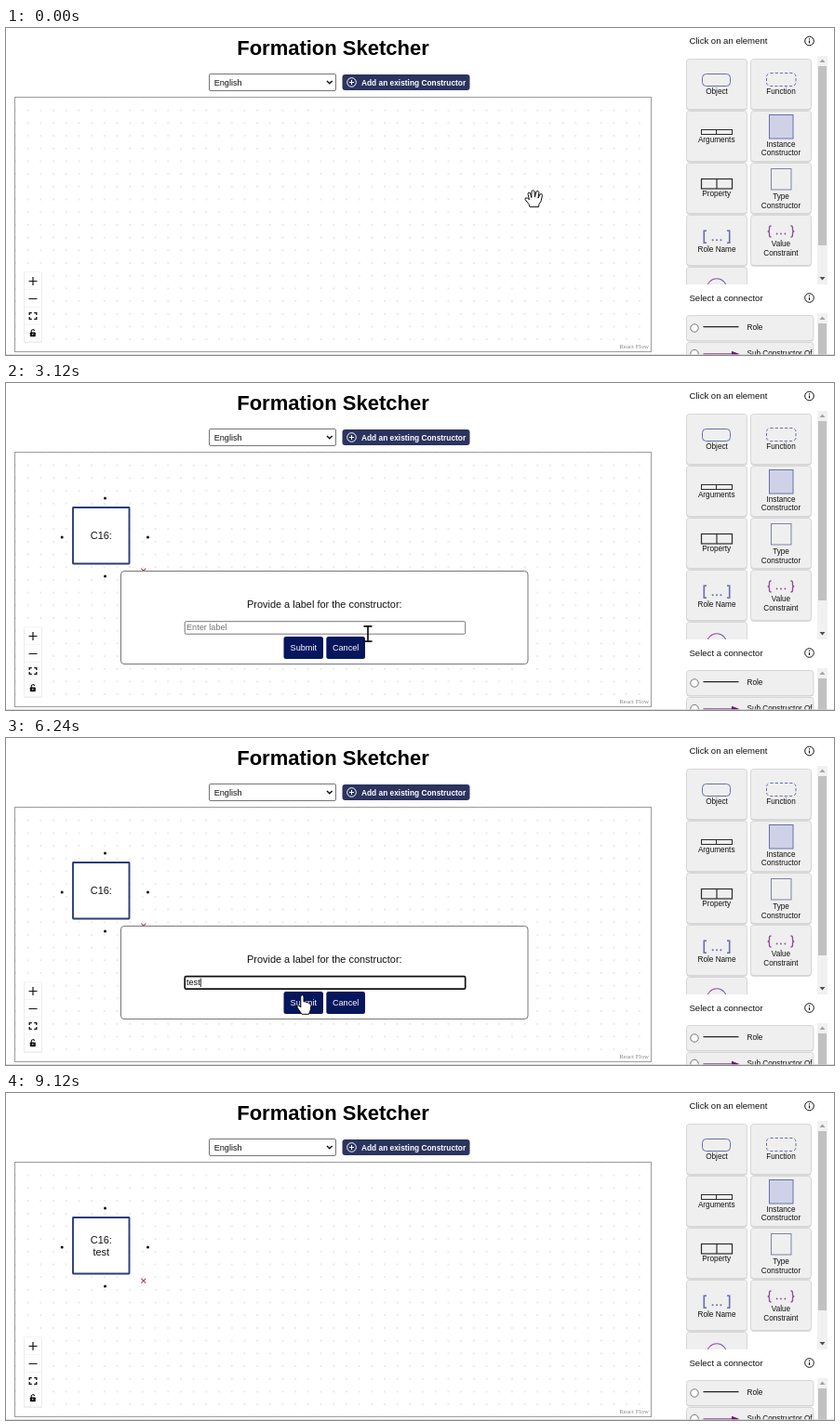
Recreate the animation shown at these times as an HTML page. Size 890x352 px, loop 9200 ms.

```html
<!DOCTYPE html>
<html lang="en">
<head>
<meta charset="utf-8">
<title>Formation Sketcher</title>
<style>
html, body { margin: 0; width: 100%; height: 100%; overflow: hidden; background: #fff; }
svg { display: block; width: 890px; height: 352px; }
text { font-family: "Liberation Sans", Arial, sans-serif; fill: #111; white-space: pre; }
</style>
</head>
<body>
<svg id="stage" viewBox="0 0 890 352" xmlns="http://www.w3.org/2000/svg"></svg>
<script>
const LOOP = 9200, STEP = 80;
const OPEN = 2640, FOCUS = 3680, CLOSE = 6560;
const KEYS = [[4560, 't'], [4640, 'te'], [5040, 'tes'], [5200, 'test']];
// time, x, y of the mouse
const MOUSE = [
  [0, 567, 183.6], [1200, 567, 183.6], [1840, 835, 174], [2560, 835, 174],
  [3040, 389, 270], [3760, 389, 270], [4080, 387, 278], [5600, 387, 278],
  [6080, 320, 287], [6560, 320, 287], [6960, 317, 300], [7680, 317, 300],
  [8240, 300, -20], [LOOP, 300, -20]
];
const NAVY = '#2c3c78', BLUE = '#666fae', PURPLE = '#8f4a9b';
const GAP = 13.69;
// text sizes
const SMALL = 8.2, FIELD = 9.15, SIDE = 9.56, BODY = 10.95;

const rect = (x, y, w, h, fill, stroke = 'none', r = 0, more = '') =>
  `<rect x="${x}" y="${y}" width="${w}" height="${h}" rx="${r}" fill="${fill}" stroke="${stroke}" ${more}/>`;
const path = (d, stroke, w = 1, fill = 'none', more = '') =>
  `<path d="${d}" stroke="${stroke}" stroke-width="${w}" fill="${fill}" ${more}/>`;
const circle = (x, y, r, fill, stroke = 'none', w = 1) =>
  `<circle cx="${x}" cy="${y}" r="${r}" fill="${fill}" stroke="${stroke}" stroke-width="${w}"/>`;
const text = (x, y, s, size, more = '') =>
  `<text x="${x}" y="${y}" font-size="${size}" ${more}>${s}</text>`;
const MID = 'text-anchor="middle"';

const tilePos = i => [i % 2 ? 800.5 : 731.5, 33.5 + 56 * (i >> 1)];

function tile(i) {
  const [x, y] = tilePos(i);
  return rect(x, y + 1, 65, 54.3, '#cdcdcd', 'none', 3) +
    rect(x, y, 65, 54, '#efefef', '#d6d6d6', 3, `id="tile${i}"`);
}

function label(x, y, ...lines) {
  return lines.map((s, i) => text(x, y + i * 9.6, s, SMALL, MID)).join('');
}

function info(y) {
  return circle(863.5, y, 4.8, '#fff', '#111', 1) +
    path(`M863.5 ${y - .6}v3.2M863.5 ${y - 2.8}v1.2`, '#111', 1.1);
}

function header() {
  return text(351.5, 29, 'Formation Sketcher', 22, MID + ' font-weight="700" style="fill:#000"') +
    rect(218.5, 49.5, 136, 18, '#fff', '#767676', 1.5) +
    text(223.7, 61.8, 'English', FIELD) +
    path('M345 57l2.8 2.8 2.8-2.8', '#111', 1.5) +
    rect(361.5, 50, 137, 17, '#2b345f', 'none', 3) +
    circle(371.5, 58.5, 4.8, 'none', '#fff', 1) +
    path('M369 58.5h5M371.5 56v5', '#fff', 1) +
    text(382, 61.7, 'Add an existing Constructor', 8.36, 'font-weight="700" style="fill:#fff"');
}

function controls() {
  const rows = [0, 1, 2, 3].map(i => rect(20, 263 + i * 18.75, 18, 18.25, '#fefefe')).join('');
  return rect(19, 262.5, 20, 76.5, '#ececec', 'none', 1) + rows +
    path('M24.5 272.5h9M29 268v9M24.5 291.5h9', '#111', 1.2) +
    path('M25.2 309v-2.3h2.6M30.2 306.7h2.6v2.3M32.8 311v2.3h-2.6M27.8 313.3h-2.6v-2.3', '#111', 1.3) +
    rect(25.8, 327.5, 6, 4.8, '#111', 'none', .8) +
    path('M27.2 328v-1.6a1.8 1.8 0 0 1 3.5-.5', '#111', 1.1) +
    circle(28.8, 329.8, .7, '#fff');
}

function canvasArea() {
  return rect(9.5, 74.5, 684, 274, 'url(#dots)', '#9c9c9c') +
    text(691, 345, 'React Flow', 6.95, 'text-anchor="end" style="fill:#888;font-family:\'Liberation Serif\',Times,serif"') +
    controls();
}

function scrollbar(top, bottom, thumbTop, thumbEnd) {
  return rect(872, top, 11, bottom - top, '#f1f1f1') +
    rect(873, thumbTop, 9, thumbEnd - thumbTop, '#c1c1c1') +
    path(`M874.5 ${top + 7}h6l-3-3.4z`, 'none', 0, '#a3a3a3');
}

function elements() {
  let s = '<g clip-path="url(#list)">';
  for (let i = 0; i < 9; i++) s += tile(i);
  const dark = '#2c2c2c';
  s += rect(748.5, 49.5, 30, 13, 'none', BLUE, 4) +
    rect(817.5, 48.5, 31.5, 14, 'none', BLUE, 4, 'stroke-dasharray="3.2 2"') +
    rect(747.5, 109.5, 33, 5, 'none', dark) + path('M763.5 109v6', dark) +
    rect(820.5, 93.5, 25.5, 25.5, '#cfd2e6', BLUE) +
    rect(747.5, 162.5, 33, 10.5, 'none', dark, 0, 'stroke-width="1.2"') + path('M764 162v11', dark, 1.2) +
    rect(822.5, 151.5, 21.5, 22.5, 'none', '#7d83a8') +
    path('M753 218.2h-2.7v13h2.7M775 218.2h2.7v13h-2.7', BLUE, 1.6) +
    path('M822.5 213q-2 0-2 2v2q0 2-1.8 2 1.8 0 1.8 2v2q0 2 2 2M843.5 213q2 0 2 2v2q0 2 1.8 2-1.8 0-1.8 2v2q0 2-2 2', PURPLE, 1.3) +
    [-4.4, 0, 4.4].map(d => circle(764 + d, 228.2, 1, BLUE) + circle(833 + d, 221.5, .9, PURPLE)).join('') +
    circle(764, 280.3, 10.5, 'none', 'url(#ring)', 1.1) +
    label(764, 70.5, 'Object') + label(833, 71, 'Function') +
    label(763.7, 123, 'Arguments') + label(833, 127.8, 'Instance', 'Constructor') +
    label(763.7, 181.3, 'Property') + label(833, 184, 'Type', 'Constructor') +
    label(764, 241, 'Role Name') + label(833, 235, 'Value', 'Constraint') + '</g>';
  return text(734.5, 17.3, 'Click on an element', SIDE) + info(14) + s +
    scrollbar(30, 276, 41, 234) + path('M874.5 268h6l-3 3.4z', 'none', 0, '#505050');
}

function connectors() {
  return text(734.5, 294.3, 'Select a connector', SIDE) + info(290.5) +
    rect(731.5, 310.5, 136.5, 27, '#cdcdcd', 'none', 3) +
    rect(731.5, 309.5, 136.5, 27, '#efefef', '#d6d6d6', 3) +
    rect(731.5, 338.5, 136.5, 27, '#efefef', '#d6d6d6', 3) +
    circle(740, 323, 4.2, '#fff', '#767676') + circle(740, 350.5, 4.2, '#fff', '#767676') +
    path('M749.5 321.7h38', '#222', 1.2) + path('M749.5 351h31', PURPLE, 1.6) +
    path('M780 347.8l8.5 3.2-8.5 3.2z', 'none', 0, '#6d1570') +
    text(796.5, 325, 'Role', SMALL) + text(796.5, 353, 'Sub Constructor Of', SMALL) +
    scrollbar(307, 352, 318, 352) + rect(0, 351, 890, 1, '#cfcfcf', 'none', 0, 'opacity=".7"');
}

function node() {
  const ports = [[106.5, 124], [60.2, 166], [152.5, 166], [106.5, 208]];
  return '<g id="node">' + rect(72, 134, 60.5, 60.5, '#fff', NAVY, .5, 'stroke-width="1.9"') +
    ports.map(([x, y]) => circle(x, y, 1.5, '#111')).join('') +
    text(102.3, 168.3, 'C16:', BODY, MID + ' id="nodeId"') +
    text(102.3, 174.6, 'test', BODY, MID + ' id="nodeName"') +
    path('M145.3 199.6l5 5M150.3 199.6l-5 5', '#a5444c', 1.1) + '</g>';
}

function dialog() {
  const button = (x, w, s) => rect(x, 273, w, 24, '#06165d', 'none', 2.5) +
    text(x + w / 2, 288.3, s, FIELD, MID + ' style="fill:#fff"');
  return '<g id="dialog">' + rect(123.5, 202.5, 437.5, 100, '#fff', '#777', 3.5) +
    text(342.3, 242.3, 'Provide a label for the constructor:', BODY, MID) +
    rect(192.2, 256.7, 301.5, 13.5, '#fff', '#767676', 1.5, 'id="field"') +
    text(194, 266.4, '', FIELD, 'id="entry"') +
    path('M0 258.6v9.4', '#111', .9, 'none', 'id="caret"') +
    button(298.5, 42.5, 'Submit') + button(344.3, 41.7, 'Cancel') + '</g>';
}

const ink = d => path(d, '#111', 1, '#fff', 'stroke-linejoin="round"');
const CURSORS = {
  hand: ink('M-4 9L-5 6-9 1Q-9.3-1.6-6.5-.5L-4.5 1.2-6-5Q-5.5-7.6-3.6-6L-2.2-1-2-8Q-.5-10 1-8L1.4-1.5 3-7.6Q5-9 6-7L5-.5 7-4.6Q9-6 9.5-3.5L8 3 6 6 5.5 9Z'),
  pointer: ink('M-3.2-9Q-1.6-11.6 0-9L0-3Q2-4 3-2.3 5-3 5.5-1.2 8-1.5 8 1L7.2 6 5.5 10.3H-2L-7 3Q-7.6 0-5 1L-3.2 3Z'),
  beam: path('M-4.5-8.2h9M0-8.2V8.2M-4.5 8.2h9', '#111', 1.7),
  arrow: ink('M-5-9V6L-1.5 3 1 9 3.5 8 1 2H6Z')
};

const stage = document.getElementById('stage');
stage.innerHTML = `<defs>
  <pattern id="dots" x="${10 - GAP / 2}" y="${75 - GAP / 2}" width="${GAP}" height="${GAP}" patternUnits="userSpaceOnUse">
    <rect width="${GAP}" height="${GAP}" fill="#fff"/><circle cx="${GAP / 2}" cy="${GAP / 2}" r=".7" fill="#cacace"/></pattern>
  <clipPath id="list"><rect x="728" y="28" width="143" height="248"/></clipPath>
  <linearGradient id="ring"><stop stop-color="#a84f9d"/><stop offset="1" stop-color="#7460b2"/></linearGradient>
</defs>` + rect(0, 0, 890, 352, '#fff') + header() + canvasArea() + elements() + connectors() +
  node() + dialog() + '<g id="mouse">' +
  Object.entries(CURSORS).map(([k, v]) => `<g id="${k}">${v}</g>`).join('') + '</g>';

const el = id => document.getElementById(id);
const show = (id, on) => { el(id).style.display = on ? '' : 'none'; };
const inside = (x, y, l, t, r, b) => x >= l && x <= r && y >= t && y <= b;

function mouseAt(t) {
  const i = MOUSE.findIndex(k => k[0] > t), [t0, x0, y0] = MOUSE[i - 1], [t1, x1, y1] = MOUSE[i];
  const p = (t - t0) / (t1 - t0), e = p * p * (3 - 2 * p);
  return [x0 + (x1 - x0) * e, y0 + (y1 - y0) * e];
}

function cursorKind(x, y, open, hover) {
  if (hover >= 0) return 'pointer';
  if (open && inside(x, y, 123, 202, 561, 302)) {
    if (inside(x, y, 298, 273, 386, 297)) return 'pointer';
    return inside(x, y, 192, 254, 494, 280) ? 'beam' : 'arrow';
  }
  return inside(x, y, 9, 74, 694, 349) ? 'hand' : 'arrow';
}

function drawDialog(t) {
  const focus = t >= FOCUS, typed = KEYS.filter(k => k[0] <= t).pop();
  const entry = el('entry'), field = el('field');
  entry.textContent = typed ? typed[1] : 'Enter label';
  entry.style.fill = typed ? '#111' : '#757575';
  field.setAttribute('stroke', focus ? '#111' : '#767676');
  field.setAttribute('stroke-width', focus ? 1.7 : 1);
  const since = t - (typed ? typed[0] : FOCUS);
  const end = typed ? entry.getComputedTextLength() : 0;
  show('caret', focus && since % 1000 < 500);
  el('caret').setAttribute('transform', `translate(${194.6 + end} 0)`);
}

function draw(now) {
  const t = Math.floor((now % LOOP) / STEP) * STEP;
  const open = t >= OPEN && t < CLOSE, named = t >= CLOSE;
  const [x, y] = mouseAt(t);

  let hover = -1;
  for (let i = 0; i < 9; i++) {
    const [l, top] = tilePos(i), on = inside(x, y, l, top, l + 65, top + 54);
    if (on) hover = i;
    el('tile' + i).setAttribute('fill', on ? '#dcdcdc' : '#efefef');
  }

  show('node', t >= OPEN);
  show('nodeName', named);
  el('nodeId').setAttribute('y', named ? 162 : 168.3);

  show('dialog', open);
  if (open) drawDialog(t);

  const kind = cursorKind(x, y, open, hover);
  for (const k in CURSORS) show(k, k === kind);
  el('mouse').setAttribute('transform', `translate(${x.toFixed(2)} ${y.toFixed(2)})`);
}

function tick() {
  draw(performance.now());
  requestAnimationFrame(tick);
}
tick();
</script>
</body>
</html>
```
